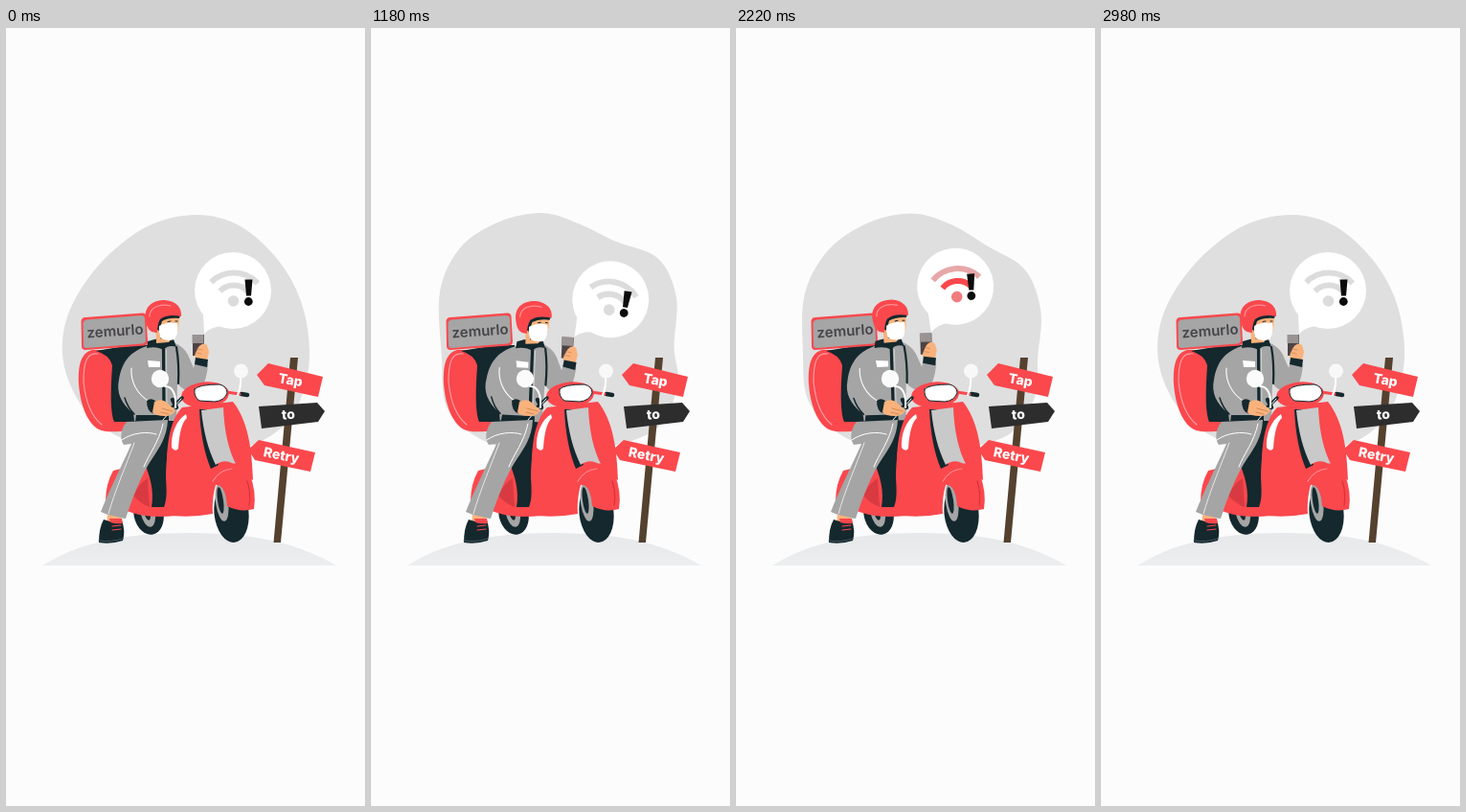
An HTML page with a canvas that plays this animation: 375 by 812 pixels, repeating every 3000 ms.

```html
<!DOCTYPE html>
<html lang="en">
<head>
<meta charset="utf-8">
<title>Connection lost</title>
<style>
html, body { margin: 0; width: 100%; height: 100%; overflow: hidden; background: #fcfcfc; }
canvas { display: block; width: 375px; height: 812px; }
</style>
</head>
<body>
<canvas id="stage"></canvas>
<script>
const W = 375, H = 812, LOOP = 3000;
const RED = '#fa484d', DARK = '#14282d', GREY = '#a5a5a5', SKIN = '#f9b27c', WHITE = '#fff';
const canvas = document.getElementById('stage');
const c = canvas.getContext('2d');
const dpr = window.devicePixelRatio || 1;
canvas.width = W * dpr;
canvas.height = H * dpr;

const rad = d => d * Math.PI / 180;
const clamp = v => Math.max(0, Math.min(1, v));
const ease = v => (1 - Math.cos(Math.PI * clamp(v))) / 2;
const mix = (a, b, p) => a + (b - a) * p;

function fill(d, color) {
  c.fillStyle = color;
  c.fill(new Path2D(d));
}
function line(d, color, width) {
  c.strokeStyle = color;
  c.lineWidth = width;
  c.stroke(new Path2D(d));
}
function oval(x, y, rx, ry, color, turn = 0) {
  c.fillStyle = color;
  c.beginPath();
  c.ellipse(x, y, rx, ry, rad(turn), 0, Math.PI * 2);
  c.fill();
}
function label(text, x, y, deg, font, color) {
  c.save();
  c.translate(x, y);
  c.rotate(rad(deg));
  c.font = font;
  c.fillStyle = color;
  c.textAlign = 'center';
  c.textBaseline = 'middle';
  c.fillText(text, 0, 0);
  c.restore();
}
function turned(x, y, deg, draw) {
  c.save();
  c.translate(x, y);
  c.rotate(rad(deg));
  c.translate(-x, -y);
  draw();
  c.restore();
}

// Backdrop: egg and pebble outlines, blended point by point
const egg = [[200,195],[245,207],[284,242],[308,285],[317,335],[311,378],[293,412],[255,436],
  [195,444],[130,432],[88,405],[65,367],[59,327],[71,285],[104,240],[150,206]];
const pebble = [[178,193],[215,204],[253,221],[299,237],[319,277],[317,330],[322,370],[300,418],
  [230,440],[150,440],[105,424],[79,395],[75,345],[72,275],[93,228],[133,202]];

function backdrop(p) {
  const pts = egg.map((a, i) => [mix(a[0], pebble[i][0], p), mix(a[1], pebble[i][1], p)]);
  const n = pts.length, at = i => pts[(i + n) % n];
  c.beginPath();
  c.moveTo(...pts[0]);
  for (let i = 0; i < n; i++) {
    const [a, b, d, e] = [at(i - 1), at(i), at(i + 1), at(i + 2)];
    c.bezierCurveTo(b[0] + (d[0] - a[0]) / 6, b[1] + (d[1] - a[1]) / 6,
      d[0] - (e[0] - b[0]) / 6, d[1] - (e[1] - b[1]) / 6, d[0], d[1]);
  }
  c.fillStyle = '#dfdfdf';
  c.fill();
}

function ground() {
  const g = c.createLinearGradient(0, 527, 0, 562);
  g.addColorStop(0, '#e6e8ea');
  g.addColorStop(1, '#eceef0');
  fill('M38 561C72 540 115 527 192 527C268 527 310 541 345 561Z', g);
}

function signs() {
  fill('M297 344L305 344L287 537L279.500 537Z', '#54412e');
  fill('M262 362L274 350L331 364L326 385L270 373Z', RED);
  fill('M264 395L325 391L333 400L326 411L267 418Z', '#2d2d2d');
  fill('M253 440L264 430L323 443L318 463L260 451Z', RED);
  const font = '800 14px Inter, "Open Sans", sans-serif';
  label('Tap', 297, 368, 10, font, WHITE);
  label('to', 295, 404, -4, font, WHITE);
  label('Retry', 287.5, 446.5, 11, font, WHITE);
}

function cargo() {
  fill('M90 336C79 339 75 350 76 372C78 396 86 413 97 419Q105 423 130 420L130 406L120 400L120 336Z', RED);
  fill('M94 337L130 331L150 331L160 411L113 411C108 398 110 370 111 352Q108 341 94 337Z', DARK);
  line('M96 340C84 338 81 350 81 369C83 390 90 406 100 414', '#ff9da0', 1.2);
  fill('M83 302L142 297.5Q146 297 146.5 301L148 327Q148 331 144 331.500L83 336Q79 336 79 332L78.500 306Q79 302 83 302Z', RED);
  fill('M84 304.500L141 300Q144.500 300 145 303L146 326Q146 329 142 329.500L84 334Q81 334 81 331L80.500 308Q81 305 84 304.500Z', GREY);
  label('zemurlo', 114, 317, -4, '600 15px Inter, "Open Sans", sans-serif', '#464448');
}

function wheels() {
  oval(149, 507, 15.5, 22, DARK, -12);
  oval(148, 505, 7.5, 16, GREY, -12);
  oval(147, 503, 3.5, 11, DARK, -12);
  oval(235.5, 506, 18, 31, DARK, -6);
  oval(225.5, 495, 6.5, 20, GREY, -8);
  oval(224, 493, 3, 14, DARK, -8);
}

function scooterBody() {
  fill('M112 462Q104 476 104 494Q112 500 132 506Q150 512 178 509L180 412L146 420L128 458Z', RED);
  fill('M133 488Q139 475 148 470L150 500Q140 496 133 488Z', '#d93a41');
  fill('M143 450C150 430 158 414 178 404C170 425 167 450 167 470C168 484 168 493 165 500L152 500C155 484 151 468 143 450Z', DARK);
}

function leg() {
  fill('M126 411C119 419 119 430 123 435L131 434C121 457 108 482 99 505Q112 511 125 512C133 488 142 465 153 449C160 438 168 428 169 409Z', GREY);
  line('M121 430C132 422 148 421 157 424', WHITE, 1);
  line('M134 433C126 455 113 485 107 507', '#e8e8e8', 1);
  line('M164 413C160 432 149 445 144 458', WHITE, 1);
  fill('M106 508L120 511L121 518L105 518Z', SKIN);
  fill('M102 513Q112 517 121 514Q125 525 122 535Q110 539 97 537Q97 522 102 513Z', DARK);
  fill('M108 512L121 512L122 517Q115 518 109 516Z', RED);
  line('M111 520L120 519M111 524L120 523', RED, 1.2);
  line('M97 535Q110 537 122 533', '#40545a', 1);
}

function shield() {
  fill('M184 396C172 408 168 432 168 456C168 476 170 492 166 508Q190 512 216 507C215 480 222 463 234 459L258 472C257 440 253 410 237 390Z', RED);
  fill('M202 398L210 398C210 424 214 444 222 456L214 460C207 444 203 422 202 398Z', DARK);
  fill('M204 399L227 396C228 420 232 440 241 457Q229 448 219 456C211 440 206 420 204 399Z', '#c9c9c9');
  fill('M214 478C218 455 246 446 254 464Q262 484 259 502Q245 506 231 499C230 484 226 473 214 478Z', RED);
  line('M216 473Q223 461 236 460', '#ff8b8e', 1.2);
  line('M252 473Q256 485 254 498', '#d83239', 1.2);
  fill('M188 403C178 409 172 424 173 438Q177 443 180 439C181 425 183 412 189 407Z', WHITE);
}

function headlight() {
  line('M246 382L252 383', DARK, 4.5);
  line('M230 380L244 382', RED, 3);
  line('M245 362Q246 374 242 383', WHITE, 2);
  oval(245.5, 358, 7.5, 7.5, '#f8f8f8');
  oval(208, 383, 25, 13.5, RED, -5);
  const lens = 'M197 377Q201 372 223 372Q231 374 231 381Q228 389 218 390L202 389Q196 385 197 377Z';
  fill(lens, WHITE);
  line(lens, DARK, 1);
  line('M184 386L163 406', DARK, 3.5);
  line('M183 387L164 409', WHITE, 1);
}

function gripHand() {
  fill('M147 389Q152 385 157 390L154 402Q147 401 147 389Z', DARK);
  fill('M155 390Q163 386 168 391L177 399Q174 405 166 405Q156 405 153 401Z', SKIN);
  line('M163 397L174 400M162 401L170 403', '#c9804f', .8);
  line('M174 388L178 396', DARK, 4.5);
  line('M166 374C174 374 178 382 177 396', WHITE, 2);
  oval(161, 366, 9.2, 9.2, '#fbfbfb');
}

function head() {
  fill('M156 303L181 301L180 316L170 328L157 329Z', SKIN);
  fill('M156 303Q168 298 182 300L181 303Q170 302 163 306L160 316L156 314Z', DARK);
  line('M159 311L162 324', DARK, 1);
  line('M169 306.500L172 306M177 306L179 306', DARK, 1);
  fill('M160 311Q168 306 179 308Q181 318 176 325Q167 328 161 323Q159 317 160 311Z', WHITE);
  fill('M146 306C143 291 153 284 166 284C178 285 184 292 183 301Q169 298 161 304Q158 309 158 318Q148 319 146 306Z', RED);
  line('M150 301C150 292 160 287 172 290', '#ff8f92', 1.2);
}

function rider() {
  fill('M150 331L175 328Q186 333 190 341L196 355L198 346L211 351C210 365 206 376 199 379Q188 382 179 371L178 410L134 410L133 402C120 392 115 380 118 367C121 349 129 337 150 331Z', GREY);
  fill('M136 404L170 404L170 411L135 411Z', DARK);
  fill('M148 327Q161 322 175 325L178 333Q170 330 164 336Q158 332 147 334Z', DARK);
  line('M164.5 334L165 405', DARK, 3.2);
  line('M167.5 336L168 400', '#dedede', .8);
  line('M178 333Q181 350 180 371', DARK, 2.2);
  line('M131 355C130 368 136 382 150 390', WHITE, 1.1);
  line('M134 403Q127 396 124 386', DARK, 1.5);
  fill('M148 347L161 348L161 354L149 354Z', WHITE);
  head();
  fill('M195 320L207 320L207 342L195 342Z', '#4d4244');
  fill('M194.500 320L206.500 320L206.500 329L194.500 329Z', '#9a9394');
  fill('M201 333Q206 327 210 331L212 338L210 347L199 347Q196 343 198 339Z', SKIN);
  line('M200 335L205 336M199 339L204 340', '#d18b58', .8);
  fill('M198 344L211 346L210 354L197 351Z', DARK);
}

// Rise from a to b, hold until d, fall until e
const pulse = (t, a, b, d, e) => Math.min(clamp((t - a) / (b - a)), clamp((e - t) / (e - d)));
const glow = p => `rgb(${mix(220, 251, p)},${mix(220, 71, p)},${mix(220, 76, p)})`;

function arc(r, color) {
  c.beginPath();
  c.arc(238, 289, r, rad(-135), rad(-42));
  c.strokeStyle = color;
  c.lineWidth = 6;
  c.lineCap = 'butt';
  c.stroke();
  c.lineCap = 'round';
}

function bubble(t) {
  const k = t % 1500;
  oval(237, 274, 40, 40, WHITE);
  fill('M207 319L206 298L225 311Q214 312 207 319Z', WHITE);
  arc(33.5, glow(pulse(k, 650, 850, 860, 1020)));
  arc(20.5, glow(pulse(k, 380, 580, 800, 930)));
  oval(237.5, 285, 5.8, 5.8, glow(pulse(k, 250, 400, 650, 850)));
  // The mark shakes once while the signal lights up
  const shake = -6.5 * Math.sin(2 * Math.PI * clamp((k - 330) / 660));
  turned(253.3, 275, shake, () => {
    fill('M249.500 262.500L257.500 262.500L256 279.500L251 279.500Z', '#0c0c0c');
    oval(253.3, 285.5, 4.4, 4.4, '#0c0c0c');
  });
}

function sway(t) {
  if (t < 850) return ease(t / 850);
  if (t < 1850) return mix(1, -.52, ease((t - 850) / 1000));
  return mix(-.52, 0, ease((t - 1850) / 950));
}

function frame(now) {
  const t = now % LOOP, s = sway(t);
  c.setTransform(dpr, 0, 0, dpr, 0, 0);
  c.lineCap = c.lineJoin = 'round';
  c.fillStyle = '#fcfcfc';
  c.fillRect(0, 0, W, H);
  backdrop(Math.pow(ease(1 - Math.abs(t / 1500 - 1)), .6));
  ground();
  signs();
  cargo();
  wheels();
  scooterBody();
  turned(145, 425, 4.2 * s, () => {
    turned(207, 325, 12.5 * s, () => bubble(t));
    rider();
  });
  leg();
  shield();
  headlight();
  gripHand();
  requestAnimationFrame(frame);
}
requestAnimationFrame(frame);
</script>
</body>
</html>
```
